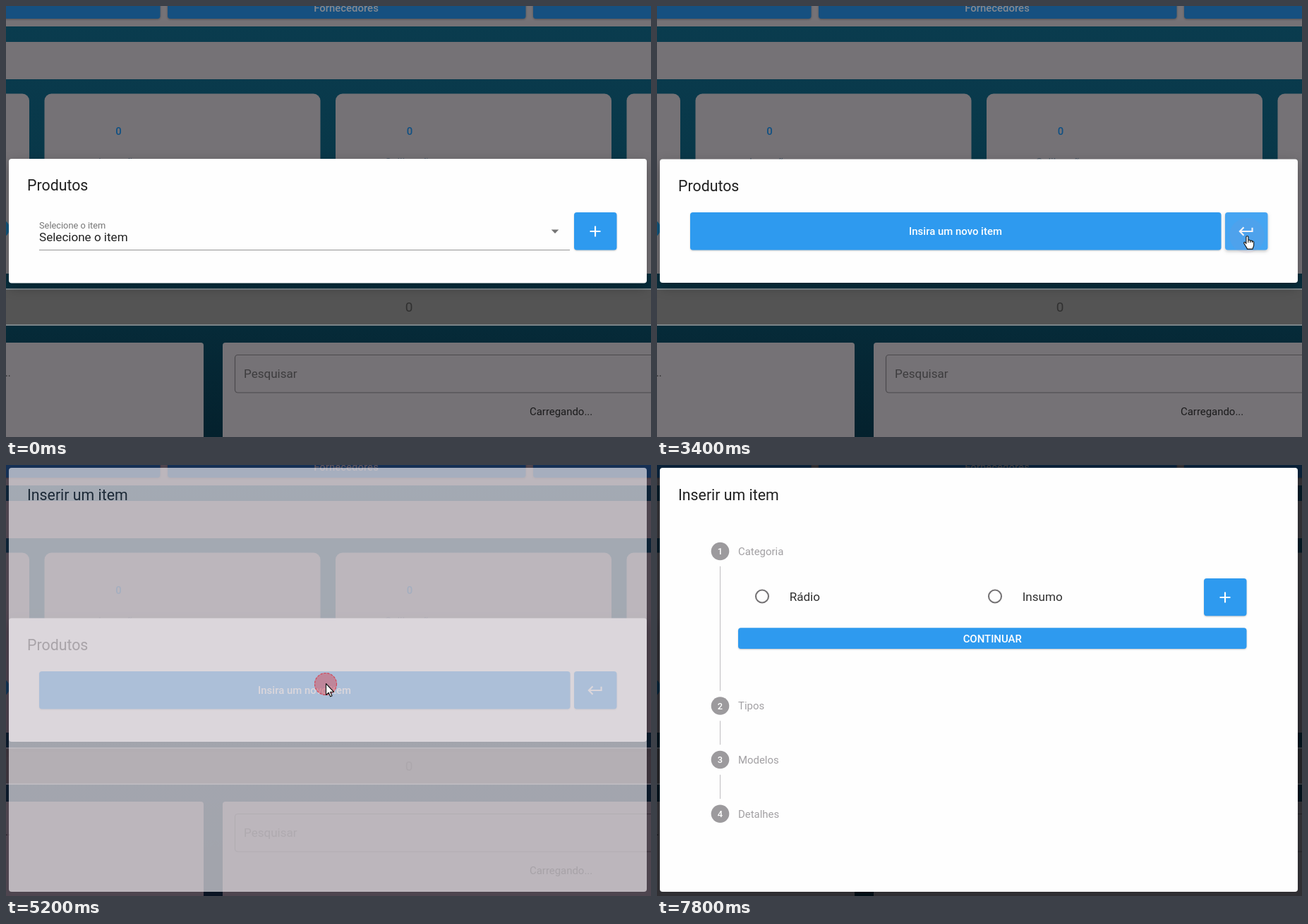
These frames come from a looping animation (914 by 612 pixels, 8 s). An HTML page with a canvas:

```html
<!DOCTYPE html>
<html lang="pt">
<head>
<meta charset="utf-8">
<title>Produtos</title>
<style>
html, body { margin: 0; width: 914px; height: 612px; overflow: hidden; background: #04202c; }
canvas { display: block; font-family: Roboto, sans-serif; }
</style>
</head>
<body>
<canvas id="stage" width="914" height="612"></canvas>
<script>
const W = 914, H = 612, LOOP = 8000, STEP = 200;
const c = document.getElementById('stage').getContext('2d');

const GREY = '#757276', BLUE = '#2e9aef', HOVER = '#45a5f2';
const DIM_BLUE = '#165080';
// Type sizes of the interface, in pixels
const SMALL = 12.8, BODY = 14.93, INPUT = 17.07, TITLE = 21.33;

const ICONS = {
  plus: new Path2D('M19 13h-6v6h-2v-6H5v-2h6V5h2v6h6v2z'),
  back: new Path2D('M19 7v4H5.83l3.58-3.59L8 6l-6 6 6 6 1.41-1.41L5.83 13H21V7z')
};
const ARROW = new Path2D('M0 0V16L3.7 12.7L6.2 18.2L8.5 17.2L6.1 11.8H11.2Z');
const HAND = new Path2D(
  'M-1.6 1.6C-1.6 -.3 1.4 -.3 1.4 1.6V6.4C2 5.4 4.1 5.6 4.3 7C5 6.2 6.8 6.5 7 7.8' +
  'C7.8 7.2 9.2 7.6 9.2 9V13C9.2 15.5 7.6 16.3 7.6 18.6H-.2C-.2 16.6 -2.2 15.2 -3.2 13' +
  'L-4.8 10.4C-5.3 9 -3.6 8.2 -2.7 9.4L-1.6 10.8Z');

const clamp = v => Math.max(0, Math.min(1, v));
const smooth = v => { v = clamp(v); return v * v * (3 - 2 * v); };
const lerp = (a, b, k) => a + (b - a) * k;

function box(x, y, w, h, r, fill) {
  c.beginPath();
  c.roundRect(x, y, w, h, r);
  c.fillStyle = fill;
  c.fill();
}

function rect(x, y, w, h, fill) {
  c.fillStyle = fill;
  c.fillRect(x, y, w, h);
}

function disc(x, y, r, fill) {
  c.beginPath();
  c.arc(x, y, r, 0, Math.PI * 2);
  c.fillStyle = fill;
  c.fill();
}

function text(str, x, y, size, fill, weight = 400, align = 'left') {
  c.font = `${weight} ${size}px Roboto, sans-serif`;
  c.textAlign = align;
  c.fillStyle = fill;
  c.fillText(str, x, y);
}

function shadowed(color, blur, dy, paint) {
  c.save();
  c.shadowColor = color;
  c.shadowBlur = blur;
  c.shadowOffsetY = dy;
  paint();
  c.restore();
}

function button(x, y, w, h, hot) {
  shadowed('rgba(0,0,0,.22)', hot ? 4 : 2, hot ? 2 : 1,
    () => box(x, y, w, h, 4, hot ? HOVER : BLUE));
}

function icon(name, x, y) {
  c.save();
  c.translate(x, y);
  c.scale(1.067, 1.067);
  c.translate(-12, -12);
  c.fillStyle = '#fff';
  c.fill(ICONS[name]);
  c.restore();
}

function drawPage() {
  const teal = c.createLinearGradient(0, 0, 0, H);
  teal.addColorStop(0, '#0a3c4f');
  teal.addColorStop(.4, '#083748');
  teal.addColorStop(1, '#04212d');
  rect(0, 0, W, H, teal);

  rect(0, 0, W, 29, GREY);
  for (const [x, w] of [[-20, 238.5], [229, 507.5], [747, 200]])
    shadowed('rgba(0,0,0,.3)', 3, 1, () => box(x, -20, w, 38, 4, DIM_BLUE));
  text('Fornecedores', 482, 8, BODY, '#86898f', 500, 'center');
  rect(0, 51, W, 53, GREY);

  for (let i = -1; i < 3; i++) box(54.5 + i * 412.5, 124.5, 391, 255.5, 10, GREY);
  const labels = ['Locação', 'Calibração'];
  labels.forEach((label, i) => {
    const x = 159.5 + i * 412.5;
    text('0', x, 182.5, BODY, '#0f5084', 500, 'center');
    text(label, x, 227, BODY, '#3f4d5c', 400, 'center');
  });
  disc(-8, 316, 13, '#12587f');

  rect(0, 401, W, 53, '#7c8488');
  rect(0, 403, W, 49, '#545454');
  text('0', 571, 434, 19, '#303030', 400, 'center');

  box(-20, 478, 300, 150, 4, GREY);
  text('...', -5, 526, BODY, '#252526');
  box(307, 478, 640, 150, 4, GREY);
  c.beginPath();
  c.roundRect(324.5, 495.5, 640, 53.5, 4);
  c.strokeStyle = '#4b494c';
  c.lineWidth = 1.2;
  c.stroke();
  text('Pesquisar', 337, 528, INPUT, '#3d3c3e');
  text('Carregando...', 742, 580.5, BODY, '#1b1b1c');
}

function drawPicker(adding, cur) {
  const top = adding ? 217.5 : 217, bottom = adding ? 393 : 393.6;
  shadowed('rgba(0,0,0,.28)', 18, 6, () => box(4, top, 904, bottom - top, 4, '#fefefe'));
  text('Produtos', 30, adding ? 263.3 : 262.3, TITLE, '#212121');

  const inRow = cur && cur.y > 293 && cur.y < 347;
  const onIcon = inRow && cur.x > 805 && cur.x < 866;
  const onWide = inRow && adding && cur.x > 47 && cur.x < 799;

  if (adding) {
    button(47, 293, 752.5, 53.5, onWide);
    text('Insira um novo item', 423, 325, BODY, '#fff', 500, 'center');
  } else {
    text('Selecione o item', 47, 315.5, SMALL, '#767676');
    text('Selecione o item', 47, 334, INPUT, '#222');
    rect(47, 346, 752, 1, '#949494');
    c.beginPath();
    c.moveTo(772.7, 317.6);
    c.lineTo(783.3, 317.6);
    c.lineTo(778, 322.9);
    c.fillStyle = '#757575';
    c.fill();
  }
  button(805, 293, 60.5, 53.5, onIcon);
  icon(adding ? 'back' : 'plus', 835, 320);
  return onIcon || onWide;
}

function drawSpinner(ms) {
  const cycle = Math.floor(ms / 1000), part = ms % 1000;
  const grow = smooth(part / 500), shrink = smooth((part - 500) / 500);
  const turn = -90 + ms * .18 + 270 * cycle;
  const rad = Math.PI / 180;
  c.beginPath();
  c.arc(456, 320, 19.3, (turn + 270 * shrink) * rad, (turn + 18 + 270 * grow) * rad);
  c.strokeStyle = '#3896df';
  c.lineWidth = 4;
  c.stroke();
}

function drawStepper() {
  const steps = [['Categoria', 122.5], ['Tipos', 342], ['Modelos', 418.5], ['Detalhes', 495.3]];
  steps.forEach(([label, y], i) => {
    disc(89.5, y, 12.8, '#9c9a9d');
    text(i + 1, 89.5, y + 4.6, SMALL, '#fff', 500, 'center');
    text(label, 115, y + 5.4, BODY, '#a2a0a3');
    if (i < 3) rect(89, y + 21.3, 1, steps[i + 1][1] - y - 42.6, '#bfbdc0');
  });

  for (const [label, x] of [['Rádio', 149], ['Insumo', 479]]) {
    c.beginPath();
    c.arc(x, 186.5, 9, 0, Math.PI * 2);
    c.strokeStyle = '#747274';
    c.lineWidth = 2.1;
    c.stroke();
    text(label, x + 38.7, 192.5, INPUT, '#303030');
  }
  button(775, 161, 60.5, 53.3);
  icon('plus', 805, 188);
  button(115, 231.3, 720.5, 29.7);
  text('CONTINUAR', 475.2, 251.6, BODY, '#fff', 500, 'center');
}

function drawDialog(t) {
  const shown = t >= 5400;
  rect(0, 0, W, H, shown ? 'rgba(0,0,6,.59)' : 'rgba(20,0,20,.4)');
  c.globalAlpha = shown ? 1 : .62;
  box(4, 4, 904, 602, 4, shown ? '#fefefe' : '#fffcff');
  c.globalAlpha = 1;
  text('Inserir um item', 30, 50.3, TITLE, shown ? '#212121' : '#1c2937');
  if (t >= 6800) drawStepper();
  else if (shown) drawSpinner(t - 5200);
}

function drawClick(x, y, age) {
  const u = age / 200;
  if (u < 0 || u > 2.2) return;
  const r = 4 + 13.5 * u - 1.5 * u * u;
  c.globalAlpha = .8 - .35 * u;
  disc(x, y, r, u < 1.5 ? '#d8404f' : '#9a86b8');
  c.globalAlpha = clamp(1.1 - .4 * u * u);
  c.beginPath();
  c.arc(x, y, r - .5, 0, Math.PI * 2);
  c.setLineDash([3, 2]);
  c.strokeStyle = '#e02c3a';
  c.lineWidth = 1.2;
  c.stroke();
  c.setLineDash([]);
  c.globalAlpha = 1;
}

function cursorAt(t) {
  if (t < 1600 || t >= 7800) return null;
  if (t >= 7600) return { x: 897, y: 303 };
  if (t >= 4000) {
    const k = smooth((t - 4000) / 800);
    return { x: lerp(836, 453, k), y: lerp(326, t < 5200 ? 311 : 310, k) };
  }
  const k = 1 - (1 - clamp((t - 1600) / 600)) ** 2;
  return { x: lerp(901, 836, k), y: lerp(382, 326, k) };
}

function drawCursor(cur, hand) {
  const shape = hand ? HAND : ARROW;
  c.save();
  c.translate(cur.x + .5, cur.y + .5);
  c.lineJoin = 'round';
  c.lineWidth = 1.1;
  c.fillStyle = '#fff';
  c.strokeStyle = '#111';
  c.fill(shape);
  c.stroke(shape);
  if (hand) {
    c.beginPath();
    for (const x of [1.4, 4.3, 7]) {
      c.moveTo(x, 6.8);
      c.lineTo(x, 9.6);
    }
    c.stroke();
  }
  c.restore();
}

function draw(t) {
  const cur = cursorAt(t), dialog = t >= 5200;
  drawPage();
  const hot = drawPicker(t >= 3200, dialog ? null : cur);
  if (dialog) drawDialog(t);
  drawClick(836, 326, t - 3000);
  drawClick(453, 311, t - 5000);
  if (cur) drawCursor(cur, hot);
}

// The picture advances five times a second
function tick() {
  const t = performance.now() % LOOP;
  draw(Math.floor(t / STEP) * STEP);
  requestAnimationFrame(tick);
}
tick();
</script>
</body>
</html>
```
